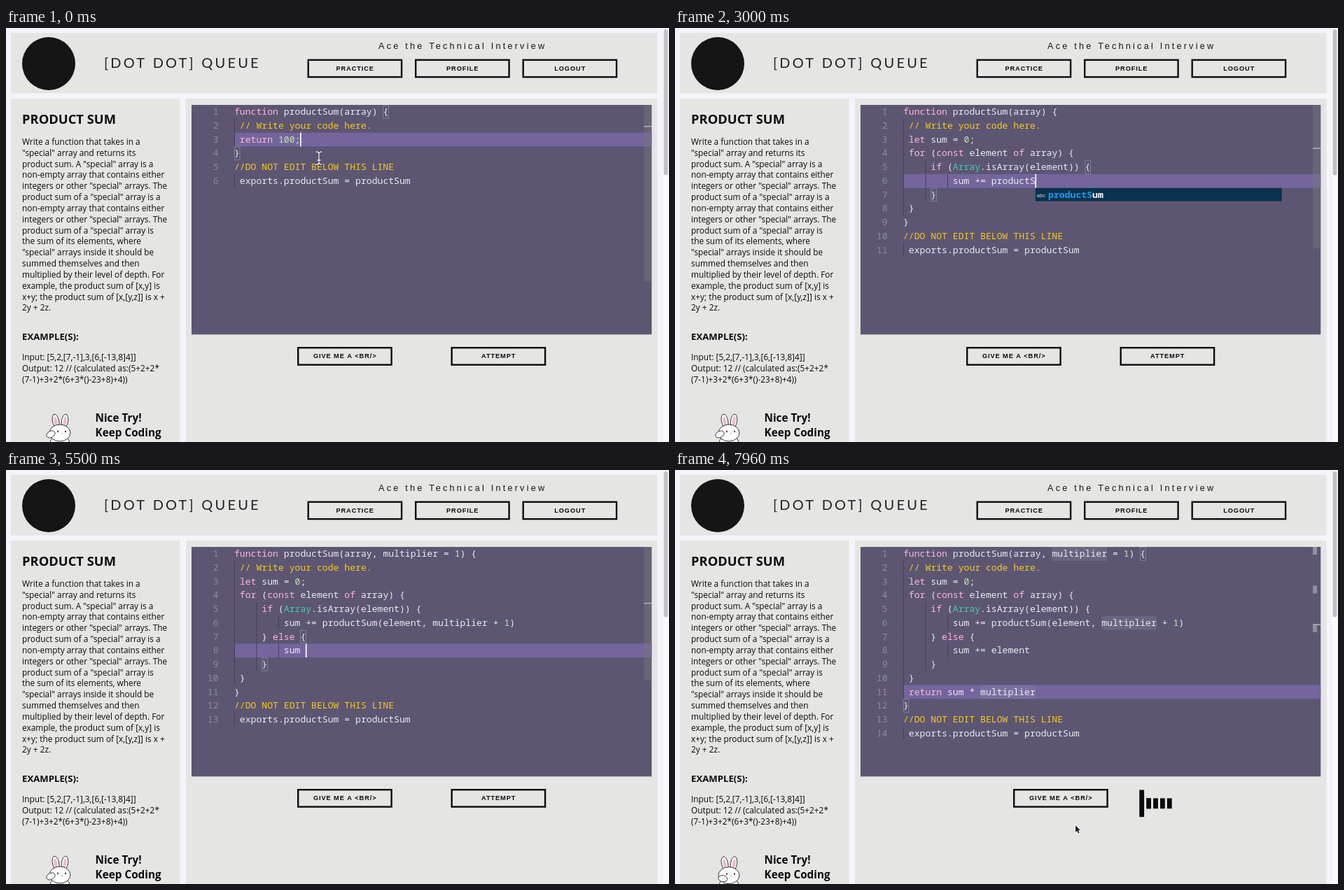
Recreate the animation shown at these times as an HTML page with a canvas. Size 947x592 px, loop 8 s.

```html
<!DOCTYPE html>
<html lang="en">
<head>
<meta charset="utf-8">
<title>Product Sum</title>
<style>
html, body { margin: 0; width: 100%; height: 100%; overflow: hidden; background: #f5f4fc; }
canvas { display: block; width: 947px; height: 592px; }
</style>
</head>
<body>
<canvas id="stage"></canvas>
<script>
const W = 947, H = 592, LOOP = 8000;
const canvas = document.getElementById("stage");
const dpr = window.devicePixelRatio || 1;
canvas.width = W * dpr;
canvas.height = H * dpr;
const ctx = canvas.getContext("2d");

const SANS = '"Open Sans", "Noto Sans", sans-serif';
const ARIAL = '"Liberation Sans", Arial, sans-serif';
const MONO = '"Noto Sans Mono", "DejaVu Sans Mono", monospace';
const PANEL = "#e5e5e3", INK = "#0b0b0b";

const rect = (x, y, w, h, color) => { ctx.fillStyle = color; ctx.fillRect(x, y, w, h); };

function label(s, x, y, font, color = INK, spacing = 0, align = "left") {
  ctx.font = font;
  ctx.fillStyle = color;
  ctx.letterSpacing = spacing + "px";
  ctx.textAlign = align;
  ctx.fillText(s, x, y);
}

function button(s, x, y) {
  ctx.strokeStyle = INK;
  ctx.lineWidth = 2.4;
  ctx.strokeRect(x + 1.2, y + 1.2, 133.4, 24.4);
  label(s, x + 68.2, y + 16.4, "bold 9.25px " + ARIAL, INK, 0.9, "center");
}

// ---- Editor model: a script of keystrokes replayed with auto-closing brackets ----
const START = [
  "function productSum(array) {",
  " // Write your code here.",
  " return 100;",
  "}",
  "//DO NOT EDIT BELOW THIS LINE",
  " exports.productSum = productSum"
].join("\n");

// [from, to, keys] types keys evenly; [at, {line, col}] moves the caret
const SCRIPT = [
  [60, 300, "\b".repeat(11)],
  [330, 740, "let sum = 0;"],
  [780, 1400, "\nfor (const element of array) {"],
  [1430, 1870, "\nif (Array.isArray("],
  [1940, 2400, "element)) {"],
  [2440, 2980, "\nsum += productS"],
  [3030, 3280, "um(elem"],
  [3320, 3320, "ent"],
  [3380, 4120, ", multiplier + 1)"],
  [4250, { line: 0, col: 25 }],
  [4310, 4580, ", multi"],
  [4620, 4620, "plier"],
  [4650, 4740, " = 1"],
  [5110, { line: 6, col: 6 }],
  [5160, 5330, " else {"],
  [5360, 5490, "\nsum "],
  [5520, 5700, "+= elem"],
  [5740, 5740, "ent"],
  [5950, { line: 9, col: 2 }],
  [6060, 6740, "\nreturn sum * multi"],
  [6900, 6900, "plier"]
];

function press(text, caret, key) {
  const before = text.slice(0, caret), after = text.slice(caret);
  if (key === "\b") return [before.slice(0, -1) + after, caret - 1];
  if (key === ")" && after[0] === ")") return [text, caret + 1];
  if (key === "\n") {
    const indent = before.split("\n").pop().match(/^ */)[0];
    const split = before.endsWith("{") && after[0] === "}";
    const head = "\n" + indent + (split ? "    " : "");
    return [before + head + (split ? "\n" + indent : "") + after, caret + head.length];
  }
  const close = { "(": ")", "{": "}" }[key] || "";
  return [before + key + close + after, caret + 1];
}

function offset(text, line, col) {
  return text.split("\n").slice(0, line).reduce((n, s) => n + s.length + 1, col);
}

function buildStates() {
  let text = START, caret = offset(text, 2, 12);
  const list = [{ t: 0, text, caret, typed: false }];
  for (const [from, to, keys] of SCRIPT) {
    if (!keys) {
      caret = offset(text, to.line, to.col);
      list.push({ t: from, text, caret, typed: false });
      continue;
    }
    [...keys].forEach((key, i) => {
      [text, caret] = press(text, caret, key);
      const t = from + (to - from) * i / Math.max(1, keys.length - 1);
      list.push({ t, text, caret, typed: key !== "\b" });
    });
  }
  return list;
}
const states = buildStates();

function enclosing(text, caret) {
  let a = caret - 1, b = caret, depth = 0;
  for (; a >= 0; a--) {
    if (")}]".includes(text[a])) depth++;
    else if ("({[".includes(text[a]) && depth-- === 0) break;
  }
  depth = 0;
  for (; b < text.length; b++) {
    if ("({[".includes(text[b])) depth++;
    else if (")}]".includes(text[b]) && depth-- === 0) break;
  }
  return a < 0 || b >= text.length ? [] : [a, b];
}

function suggestion({ text, caret, typed }) {
  const found = typed && text.slice(0, caret).match(/[A-Za-z]+$/);
  if (!found) return null;
  const prefix = found[0];
  const others = text.slice(0, caret - prefix.length) + " " + text.slice(caret);
  const word = (others.match(/[A-Za-z]+/g) || [])
    .find(w => w.startsWith(prefix) && w.length > prefix.length);
  return word ? { word, prefix } : null;
}

// ---- Editor view ----
const ED = { x: 265, y: 110, w: 657.5, h: 328.5 };
const TX = 326, CW = 7.866, LH = 19.73;
const lineY = i => ED.y + 0.2 + i * LH;
const place = (text, i) => {
  const rows = text.slice(0, i).split("\n");
  return { line: rows.length - 1, col: rows[rows.length - 1].length };
};
const TOKENS = /\/\/.*|\b(?:function|return|let|const|for|of|if|else)\b|\bArray\b|\b\d+\b|[A-Za-z]+|[^A-Za-z\d\/]+|./g;

function tokenColor(s) {
  if (s.startsWith("//")) return "#f6cb16";
  if (/^(function|return|let|const|for|of|if|else)$/.test(s)) return "#ffb5dc";
  if (s === "Array") return "#42cdaa";
  if (/^\d+$/.test(s)) return "#c3e5aa";
  return "#eceaf0";
}

function drawEditor(t) {
  const state = states.findLast(s => s.t <= t);
  const { text, caret } = state;
  const lines = text.split("\n");
  const cur = place(text, caret);
  const ratio = ED.h / (ED.h + (lines.length - 1) * LH);
  const rulerY = line => ED.y + line * LH * ratio;
  const font = "13.11px " + MONO;

  ctx.save();
  ctx.beginPath();
  ctx.rect(ED.x, ED.y, ED.w, ED.h);
  ctx.clip();
  rect(ED.x, ED.y, ED.w, ED.h, "#5c5673");
  rect(TX, lineY(cur.line), ED.x + ED.w - TX, LH, "#74659d");

  const marked = t >= 7150;
  if (marked) {
    for (const m of text.matchAll(/multiplier/g)) {
      const p = place(text, m.index);
      rect(TX + p.col * CW, lineY(p.line), 10 * CW, LH, "rgba(140,135,160,.3)");
    }
  }

  lines.forEach((s, i) => {
    const y = lineY(i), indent = s.match(/^ */)[0].length;
    for (let c = 0; c < indent; c += 4) rect(TX + c * CW, y, 1, LH, "#454057");
    label(String(i + 1), 303.5, y + 14.1, font, "#8f8c9b", 0, "right");
    for (const m of s.matchAll(TOKENS)) {
      label(m[0], TX + m.index * CW, y + 14.1, font, tokenColor(m[0]));
    }
  });

  const pair = enclosing(text, caret);
  ctx.strokeStyle = "#8a8894";
  ctx.lineWidth = 0.8;
  for (const i of pair) {
    const p = place(text, i);
    ctx.strokeRect(TX + p.col * CW + 0.3, lineY(p.line) + 0.6, CW - 0.2, LH - 1.2);
  }

  if (t < 7530 && (t - state.t) % 300 < 150) {
    rect(TX + cur.col * CW - 0.4, lineY(cur.line), 1.7, LH, "#fff");
  }

  // scrollbar and overview ruler
  const slider = Math.max(0, Math.min(1, (7430 - t) / 150));
  rect(911, ED.y, 11.5, ED.h * ratio, `rgba(121,121,121,${0.4 * slider})`);
  const block = line => rect(911, rulerY(line), 6, LH * ratio, "#918e9f");
  if (pair[0] === caret - 1 || pair[1] === caret) block(cur.line);
  if (marked) for (const m of text.matchAll(/multiplier/g)) block(place(text, m.index).line);
  rect(911, rulerY(cur.line) - 0.5, 11.5, 1.7, "#aaa8b2");
  ctx.restore();

  const hint = suggestion(state);
  if (hint) {
    const x = TX + cur.col * CW, y = lineY(cur.line + 1) + 0.3;
    rect(x, y, 352, 18.8, "#0b324e");
    label("abc", x + 2, y + 13, "7.6px " + ARIAL, "#d5dce2");
    label(hint.prefix, x + 18.3, y + 14, "bold " + font, "#199cf5");
    label(hint.word.slice(hint.prefix.length), x + 18.3 + hint.prefix.length * CW, y + 14, "bold " + font, "#fff");
  }
}

// ---- Page ----
const BODY = `Write a function that takes in a
"special" array and returns its
product sum. A "special" array is a
non-empty array that contains either
integers or other "special" arrays. The
product sum of a "special" array is a
non-empty array that contains either
integers or other "special" arrays. The
product sum of a "special" array is
the sum of its elements, where
"special" arrays inside it should be
summed themselves and then
multiplied by their level of depth. For
example, the product sum of [x,y] is
x+y; the product sum of [x,[y,z]] is x +
2y + 2z.`.split("\n");
const EXAMPLE = [
  "Input: [5,2,[7,-1],3,[6,[-13,8]4]]",
  "Output: 12 // (calculated as:(5+2+2*",
  "(7-1)+3+2*(6+3*()-23+8)+4))"
];

function drawPage() {
  rect(0, 0, W, H, "#f5f4fc");
  rect(7, 7, 923.5, 86.5, PANEL);
  rect(7, 101, 241.5, 491, PANEL);
  rect(257, 101, 673.5, 491, PANEL);
  rect(937, 0, 10, H, "#fafafa");
  rect(937, 0, 0.8, H, "#e9e8ee");
  ctx.fillStyle = "#c1c1c3";
  ctx.beginPath();
  ctx.roundRect(939.5, 2, 6, 208.5, 3);
  ctx.fill();

  ctx.fillStyle = "#151515";
  ctx.beginPath();
  ctx.arc(61, 51, 38, 0, 7);
  ctx.fill();
  label("[DOT DOT] QUEUE", 140, 57.4, "20px Lato, sans-serif", "#222", 3.2);

  label("Ace the Technical Interview", 532, 30, "12.67px " + ARIAL, "#161616", 3.22);
  button("PRACTICE", 430.5, 44.5);
  button("PROFILE", 584, 44.5);
  button("LOGOUT", 737.5, 44.5);

  const small = "11.87px " + SANS;
  label("PRODUCT SUM", 23, 137.2, "bold 18.35px " + SANS);
  BODY.forEach((s, i) => label(s, 23, 166.9 + i * 15.83, small));
  label("EXAMPLE(S):", 23, 445.8, "bold 13.2px " + SANS);
  EXAMPLE.forEach((s, i) => label(s, 23, 475.4 + i * 15.83, small));
  label("Nice Try!", 127.5, 562.6, "bold 15.3px " + SANS);
  label("Keep Coding", 127.5, 583.8, "bold 15.3px " + SANS);
}

function oval(x, y, rx, ry, turn, fill, line = true) {
  ctx.beginPath();
  ctx.ellipse(x, y, rx, ry, turn, 0, Math.PI * 2);
  ctx.fillStyle = fill;
  ctx.fill();
  if (line) ctx.stroke();
}

function drawBunny(t) {
  const phase = t % 900;
  const down = phase > 480 ? Math.sin((phase - 480) / 420 * Math.PI) : 0;
  ctx.save();
  ctx.translate(0, down * 0.8);
  ctx.strokeStyle = "#3a3538";
  ctx.lineWidth = 1;
  for (const [x, turn] of [[71, -0.2], [84, 0.15]]) {
    oval(x, 562, 4.6, 10, turn, "#fff");
    oval(x, 563, 2.4, 7.5, turn, "#f7b9cc", false);
  }
  oval(77, 594, 14, 12, 0, "#fff");
  oval(77, 579, 15, 12, 0, "#fff");
  oval(74, 577, 1, 1.4, 0, "#3a3538", false);
  oval(85, 577, 1, 1.4, 0, "#3a3538", false);
  oval(80, 580, 1.3, 0.8, 0, "#e88ca5", false);
  oval(64 + down * 5, 581 + down * 3, 6.5, 4.5, -0.5 + down * 0.8, "#fff");
  ctx.restore();
}

function drawActions(t) {
  const running = t >= 7580;
  button("GIVE ME A <BR/>", running ? 483 : 416, 456);
  if (!running) {
    button("ATTEMPT", 635.5, 456);
    return;
  }
  for (let i = 0; i < 5; i++) {
    const d = ((t - 7960 - i * 60) % 400 + 600) % 400 - 200;
    const h = 39 * (0.38 + 0.62 * Math.max(0, 1 - Math.abs(d) / 60));
    rect(663.3 + i * 9.9, 476.8 - h / 2, 6.8, h, INK);
  }
}

// ---- Pointer ----
const PATHS = [
  [[0, 447, 186], [60, 447, 186]],
  [[4180, 552, 196], [4245, 523, 128], [4400, 516, 130], [5010, 516, 130], [5100, 380, 240], [5160, 380, 240]],
  [[5870, 395, 262], [5945, 346, 298], [6040, 346, 298]],
  [[7050, 480, 330], [7450, 702, 469], [7610, 702, 469], [7900, 572, 508], [LOOP, 572, 508]]
];

function drawPointer(t) {
  const path = PATHS.find(p => t >= p[0][0] && t < p[p.length - 1][0]);
  if (!path) return;
  const i = path.findIndex(p => p[0] > t);
  const [t0, x0, y0] = path[i - 1], [t1, x1, y1] = path[i];
  const k = (t - t0) / (t1 - t0), e = k * k * (3 - 2 * k);
  const x = x0 + (x1 - x0) * e, y = y0 + (y1 - y0) * e;
  ctx.save();
  ctx.translate(x, y);
  ctx.beginPath();
  if (y < ED.y + ED.h) {
    ctx.moveTo(-4, -9); ctx.quadraticCurveTo(0, -9, 0, -6);
    ctx.lineTo(0, 6); ctx.quadraticCurveTo(0, 9, -4, 9);
    ctx.moveTo(4, -9); ctx.quadraticCurveTo(0, -9, 0, -6);
    ctx.moveTo(0, 6); ctx.quadraticCurveTo(0, 9, 4, 9);
    ctx.moveTo(-2.5, 3); ctx.lineTo(2.5, 3);
    ctx.strokeStyle = "rgba(40,36,55,.6)"; ctx.lineWidth = 2.4; ctx.stroke();
    ctx.strokeStyle = "#f4f4f6"; ctx.lineWidth = 1.3; ctx.stroke();
  } else {
    [[0, 0], [0, 10], [2.3, 8], [3.9, 11.5], [5.6, 10.7], [4.1, 7.3], [7, 7.1]]
      .forEach(p => ctx.lineTo(...p));
    ctx.closePath();
    ctx.strokeStyle = "#fff"; ctx.lineWidth = 1.6; ctx.stroke();
    ctx.fillStyle = "#222"; ctx.fill();
  }
  ctx.restore();
}

const begin = performance.now();
function frame() {
  const t = (performance.now() - begin) % LOOP;
  ctx.setTransform(dpr, 0, 0, dpr, 0, 0);
  drawPage();
  drawBunny(t);
  drawEditor(t);
  drawActions(t);
  drawPointer(t);
  requestAnimationFrame(frame);
}
frame();
</script>
</body>
</html>
```
